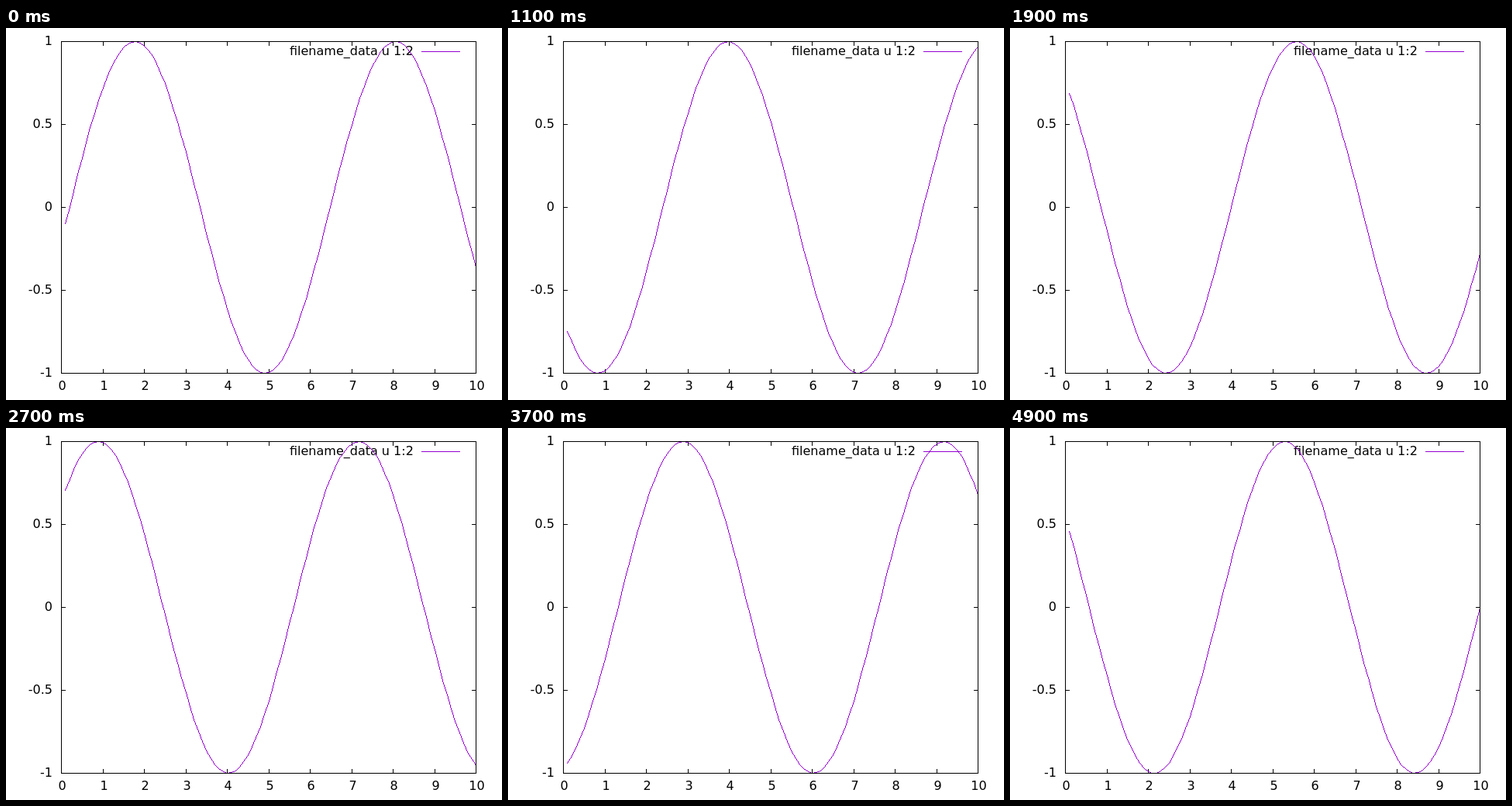
Write an HTML page with a canvas that moves like this. It is 640 px wide and 480 px high and loops after 5 s.

```html
<!DOCTYPE html>
<html lang="en">
<head>
<meta charset="utf-8">
<title>Travelling sine wave</title>
<style>
  html, body { margin: 0; width: 100%; height: 100%; overflow: hidden; background: #fff; }
  svg, canvas { position: absolute; left: 0; top: 0; width: 640px; height: 480px; }
  text { font: 16px "DejaVu Sans", sans-serif; fill: #000; }
  .end { text-anchor: end; }
  .mid { text-anchor: middle; }
</style>
</head>
<body>
<svg id="labels" viewBox="0 0 640 480">
  <text x="366" y="35">filename_data u 1:2</text>
</svg>
<canvas id="plot" width="640" height="480"></canvas>
<script>
const LEFT = 71, RIGHT = 606, TOP = 17, BOTTOM = 445, TICK = 5;
const STEP_MS = 100, STEPS = 50, PHASE_STEP = 0.2;
const svg = document.getElementById('labels');
const ctx = document.getElementById('plot').getContext('2d');

const px = x => LEFT + Math.floor(x / 10 * (RIGHT - LEFT) + 0.5);
const py = y => BOTTOM - Math.floor((y + 1) / 2 * (BOTTOM - TOP) + 0.5);

function label(str, x, y, cls) {
  const el = document.createElementNS('http://www.w3.org/2000/svg', 'text');
  el.setAttribute('x', x);
  el.setAttribute('y', y);
  el.setAttribute('class', cls);
  el.textContent = str;
  svg.appendChild(el);
}

for (let x = 0; x <= 10; x++) label(x, px(x) + 1.5, 467, 'mid');
for (let y = -1; y <= 1; y += 0.5) label(y, 60, py(y) + 5, 'end');

const hline = (x1, x2, y) => ctx.fillRect(x1, y, x2 - x1 + 1, 1);
const vline = (x, y1, y2) => ctx.fillRect(x, y1, 1, y2 - y1 + 1);

// Bresenham line, one pixel wide without smoothing
function line(x1, y1, x2, y2) {
  const steep = Math.abs(y2 - y1) > Math.abs(x2 - x1);
  if (steep) [x1, y1, x2, y2] = [y1, x1, y2, x2];
  if (x1 > x2) [x1, y1, x2, y2] = [x2, y2, x1, y1];
  const dx = x2 - x1, dy = Math.abs(y2 - y1), dir = Math.sign(y2 - y1);
  let d = 2 * dy - dx;
  for (let x = x1, y = y1; x <= x2; x++) {
    if (steep) ctx.fillRect(y, x, 1, 1);
    else ctx.fillRect(x, y, 1, 1);
    if (d >= 0) { y += dir; d -= 2 * dx; }
    d += 2 * dy;
  }
}

function ticks() {
  for (let x = 1; x < 10; x++) {
    vline(px(x), TOP, TOP + TICK);
    vline(px(x), BOTTOM - TICK, BOTTOM);
  }
  for (let y = -0.5; y <= 0.5; y += 0.5) {
    hline(LEFT, LEFT + TICK, py(y));
    hline(RIGHT - TICK, RIGHT, py(y));
  }
}

function border() {
  hline(LEFT, RIGHT, TOP);
  hline(LEFT, RIGHT, BOTTOM);
  vline(LEFT, TOP, BOTTOM);
  vline(RIGHT, TOP, BOTTOM);
}

function wave(phase) {
  const point = i => [px(i / 10), py(Math.sin(i / 10 - phase))];
  for (let i = 1; i < 100; i++) line(...point(i), ...point(i + 1));
}

function draw(step) {
  ctx.clearRect(0, 0, 640, 480);
  ctx.fillStyle = '#000';
  ticks();
  ctx.fillStyle = '#9400d3';
  hline(536, 585, 30);
  wave(PHASE_STEP * (step + 1));
  ctx.fillStyle = '#000';
  border();
}

const start = performance.now();
let shown = -1;
function tick(now) {
  const step = Math.floor(Math.max(0, now - start) / STEP_MS) % STEPS;
  if (step !== shown) draw(shown = step);
  requestAnimationFrame(tick);
}
tick(start);
</script>
</body>
</html>
```
